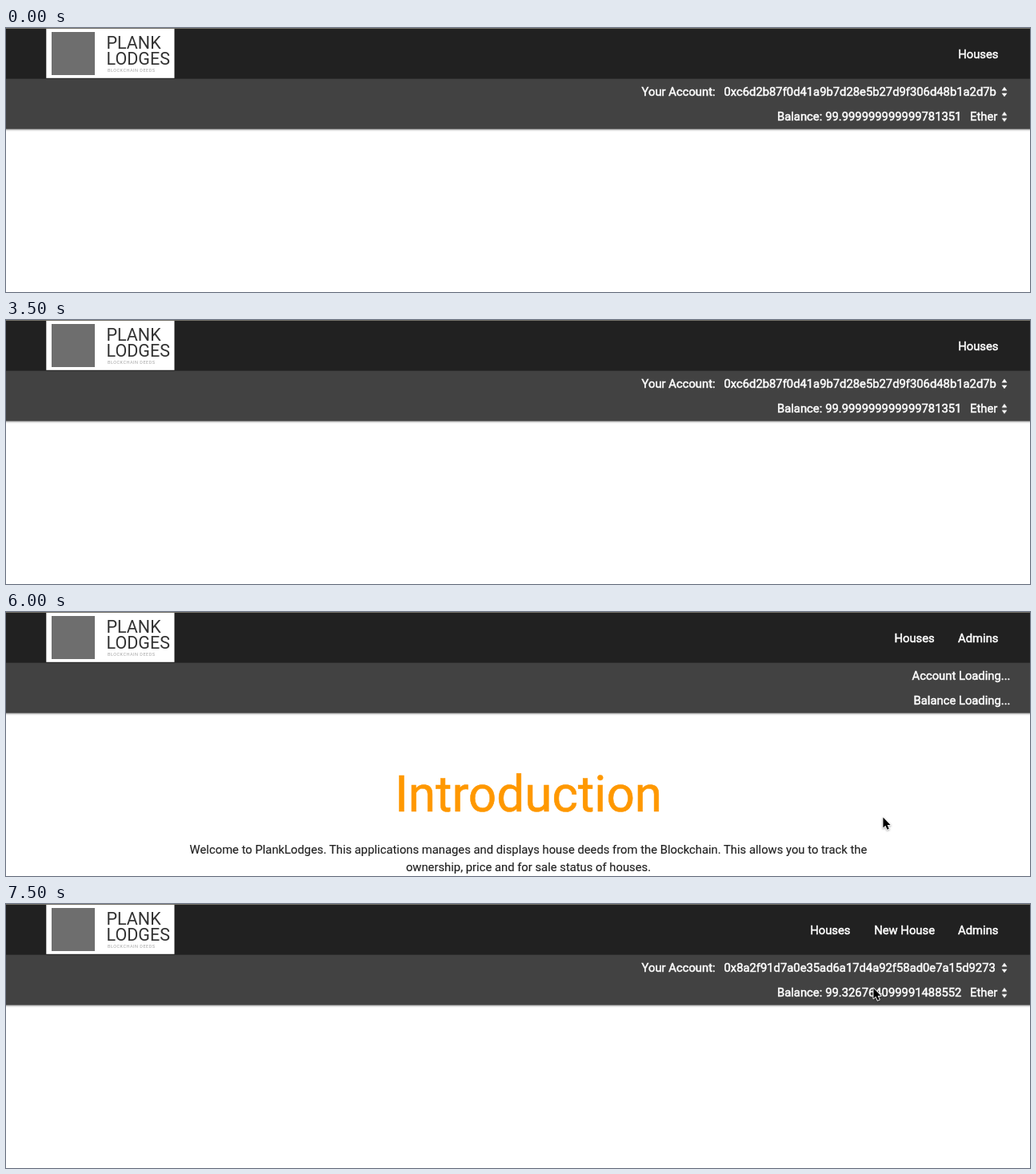
Recreate the animation shown at these times as an HTML page. Size 1280 px wide and 331 px high, loop 8000 ms.

```html
<!DOCTYPE html>
<html lang="en">
<head>
<meta charset="utf-8">
<title>House deeds</title>
<style>
html, body { margin: 0; width: 100%; height: 100%; overflow: hidden; background: #fff; }
svg { display: block; width: 1280px; height: 331px; font: 14.8px Roboto, sans-serif; }
.bar { filter: drop-shadow(0 1px 1.2px rgba(0, 0, 0, .45)); }
.light { fill: #fff; stroke: #fff; stroke-width: .5px; }
.tri { stroke: none; }
.end { text-anchor: end; }
.brand { font-size: 21.5px; fill: #333; }
.tag { font-size: 5.5px; letter-spacing: .5px; fill: #a4a4a4; }
.intro { text-anchor: middle; fill: #212121; stroke: #212121; stroke-width: .15px; }
.intro .head { font-size: 62.1px; fill: #ff9800; stroke: #ff9800; stroke-width: .6px; }

/* every change is a hard cut on one shared 8 s clock */
.first, .accountRow, .balanceRow, .caret, .second, .pair, .trio,
.loadAccount, .loadBalance, .intro, .nextAccount, .hand, .arrow {
  animation: 8s step-end infinite;
}
.first { animation-name: first; }
.accountRow { animation-name: accountRow; }
.balanceRow { animation-name: balanceRow; }
.caret { animation-name: caret; }
.second { animation-name: second; }
.pair, .loadBalance { animation-name: pair; }
.trio { animation-name: trio; }
.loadAccount { animation-name: loadAccount; }
.intro { animation-name: intro; }
.nextAccount { animation-name: nextAccount; }
.hand { animation-name: hand; }
.arrow { animation-name: arrow; }

@keyframes first { 0% { opacity: 1 } 71.875%, 100% { opacity: 0 } }
@keyframes accountRow { 0% { opacity: 1 } 71.875% { opacity: 0 } 84.375%, 100% { opacity: 1 } }
@keyframes balanceRow { 0% { opacity: 1 } 71.875% { opacity: 0 } 87.5%, 100% { opacity: 1 } }
@keyframes caret { 0% { opacity: 1 } 75% { opacity: 0 } 87.5%, 100% { opacity: 1 } }
@keyframes second { 0% { opacity: 0 } 75%, 100% { opacity: 1 } }
@keyframes pair { 0% { opacity: 0 } 75% { opacity: 1 } 87.5%, 100% { opacity: 0 } }
@keyframes trio { 0% { opacity: 0 } 87.5%, 100% { opacity: 1 } }
@keyframes loadAccount { 0% { opacity: 0 } 75% { opacity: 1 } 84.375%, 100% { opacity: 0 } }
@keyframes intro { 0% { opacity: 0 } 75% { opacity: 1 } 78.125%, 100% { opacity: 0 } }
@keyframes nextAccount { 0% { opacity: 0 } 84.375%, 100% { opacity: 1 } }
@keyframes hand { 0% { opacity: 0 } 40.625% { opacity: 1 } 43.75%, 100% { opacity: 0 } }
@keyframes arrow {
  0% { transform: translate(-50px, 0) }
  6.25% { transform: translate(966px, 182px) }
  9.375% { transform: translate(989px, 163px) }
  12.5% { transform: translate(1018px, 134px) }
  15.625% { transform: translate(1027px, 117px) }
  18.75% { transform: translate(1027px, 114px) }
  34.375% { transform: translate(1048px, 117px) }
  40.625% { transform: translate(-50px, 0) }
  59.375% { transform: translate(378px, 279px) }
  62.5% { transform: translate(772px, 233px) }
  68.75% { transform: translate(1055px, 250px) }
  71.875% { transform: translate(1095px, 257px) }
  87.5% { transform: translate(1095px, 249px) }
  90.625% { transform: translate(1073px, 134px) }
  93.75%, 100% { transform: translate(1083px, 105px) }
}
.shape { filter: drop-shadow(0 1px .8px rgba(0, 0, 0, .35)); stroke-linejoin: round; }
</style>
</head>
<body>
<svg viewBox="0 0 1280 331">
  <defs>
    <path id="updown" class="tri" d="M0 -6.2 L3.4 -1.6 H-3.4 Z M0 6.3 L3.4 1.7 H-3.4 Z"/>
  </defs>

  <rect class="bar" x="-20" y="60" width="1320" height="66.6" fill="#424242"/>
  <rect width="1280" height="63.7" fill="#212121"/>
  <rect width="1280" height="1" fill="#75736a"/>

  <rect x="50.3" y="1" width="160.2" height="61.8" fill="#fff"/>
  <rect x="57" y="5" width="54" height="54" fill="#6e6e6e"/>
  <text class="brand" x="125.5" y="26">PLANK</text>
  <text class="brand" x="125.5" y="45.5">LODGES</text>
  <text class="tag" x="127" y="55">BLOCKCHAIN DEEDS</text>

  <g class="light">
    <g class="first">
      <text class="end" x="1240.5" y="38">Houses</text>
      <text x="897.5" y="85">0xc6d2b87f0d41a9b7d28e5b27d9f306d48b1a2d7b</text>
      <text x="1024.2" y="116">99.999999999999781351</text>
    </g>
    <g class="accountRow">
      <text x="794.6" y="85">Your Account:</text>
      <use href="#updown" x="1248" y="80"/>
    </g>
    <g class="balanceRow">
      <text x="964" y="116">Balance:</text>
      <text x="1205" y="116">Ether</text>
    </g>
    <use class="caret" href="#updown" x="1248" y="111.3"/>

    <text class="second end" x="1240.5" y="38">Admins</text>
    <text class="pair end" x="1160.7" y="38">Houses</text>
    <g class="trio">
      <text class="end" x="1055.5" y="38">Houses</text>
      <text class="end" x="1161" y="38">New House</text>
      <text x="1024.2" y="116">99.326764099991488552</text>
    </g>
    <text class="loadAccount end" x="1255.5" y="85">Account Loading...</text>
    <text class="loadBalance end" x="1255.5" y="116">Balance Loading...</text>
    <text class="nextAccount" x="897.5" y="85">0x8a2f91d7a0e35ad6a17d4a92f58ad0e7a15d9273</text>
  </g>

  <g class="intro">
    <text class="head" x="653" y="250">Introduction</text>
    <text x="653" y="303">Welcome to PlankLodges. This applications manages and displays house deeds from the Blockchain. This allows you to track the</text>
    <text x="653" y="325">ownership, price and for sale status of houses.</text>
  </g>

  <g class="hand">
    <path class="shape" transform="translate(164 14)" fill="#fff" stroke="#000"
      d="M5.5 11 V3 Q5.5 1.5 6.8 1.5 Q8 1.5 8 3 V7.5 Q10.3 6.6 10.6 8.2 Q12.8 7.5 13 9.2 Q15.5 8.8 15.3 11 V14 Q15 16 14 17.5 V19.5 H7 V18 Q4.5 15.5 2 12 Q1 10 2.8 9.6 Q4 9.5 5.5 11 Z"/>
  </g>
  <g class="arrow">
    <path class="shape" fill="#000" stroke="#fff" stroke-width="1.8" paint-order="stroke"
      d="M1.4 .6 V13.4 L4.3 10.7 L6.6 15.8 L8.8 14.8 L6.6 9.9 H10.6 Z"/>
  </g>
</svg>
</body>
</html>
```
